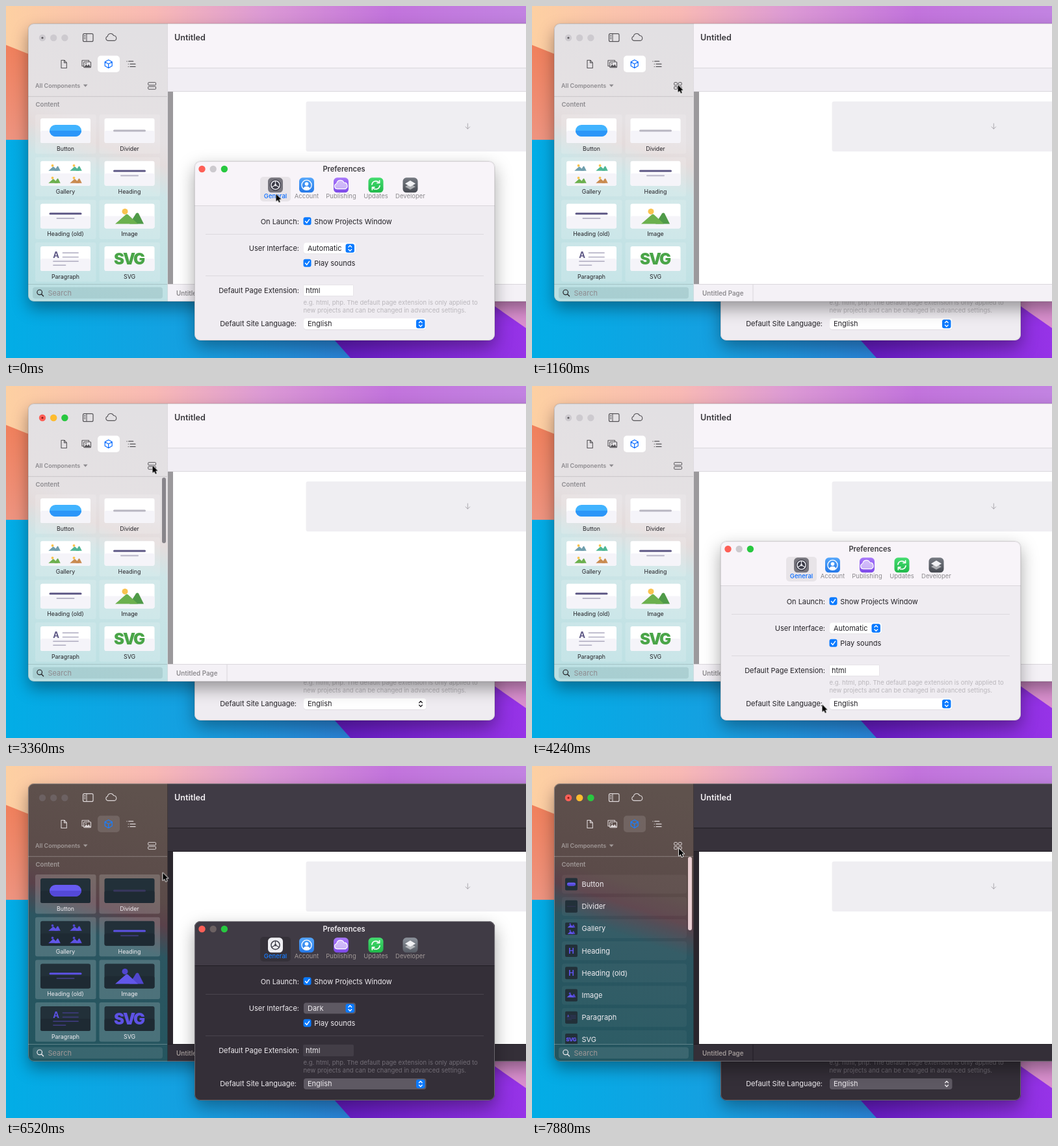
Animation, 800 px wide and 542 px high, one loop 8000 ms. Source, as an HTML page:

```html
<!DOCTYPE html>
<html lang="en">
<head>
<meta charset="utf-8">
<title>Preferences and appearance</title>
<style>
html, body { margin: 0; width: 100%; height: 100%; overflow: hidden; }
body {
  position: relative; background: #c27edc;
  font-family: Inter, Roboto, sans-serif;
  animation: flags 8s step-end infinite, theme 8s step-end infinite;
}
svg { position: absolute; display: block; width: 820px; height: 542px; left: 0; top: 0; }
text { white-space: pre; }

/* front: main window on top, key: main window active */
@keyframes flags {
  0% { --front: 0; --key: 0; --icon-grid: 0; --menu: 0; --picked: 0; }
  14% { --front: 2; }
  14.5% { --icon-grid: 1; }
  15% { --key: 1; }
  30.5% { --icon-grid: 0; }
  51.5% { --front: 0; --key: 0; }
  63% { --menu: 1; }
  75% { --menu: 0; --picked: 1; }
  88% { --front: 2; }
  88.5% { --key: 1; --icon-grid: 1; }
}
@keyframes theme {
  0% {
    --ink: #232126; --title: #3b393e; --sub: #8d8b8f; --icon: #555357; --accent: #0a6cff;
    --head: #f8f4f9; --bar: #f1eef4; --line: #dad7dc; --strip: #9b999c; --foot: #f4f1f6;
    --body: #efecf1; --ctl: #fff; --field: #fff; --rule: #dcd9de; --hint: #bab7bc;
    --cell: rgba(255,255,255,.15); --row: rgba(255,255,255,.15); --thumb: #fff; --thumb2: #f5f4f9;
    --tab: #fff; --off: #cdcacf; --dot: #5a585c; --rim: rgba(0,0,0,.13);
    --pill1: #41b3ff; --pill2: #2c96f8; --h1: #5d5785; --h2: #b8b5c8; --div: #b8b6c1;
    --leaf1: #6cb04e; --leaf2: #4f9a48; --sun: #f9c34f; --svg: #4aa548;
    --g1: #6f9fae; --g2: #4fb795; --g3: #c98b50; --search: rgba(0,50,60,.1);
    --thumbbar: rgba(112,110,116,.8); --sel: rgba(0,0,0,.065); --gear1: #77757d; --gear2: #e8e8ee; --gear3: #3b3b47;
    --dev1: #767a82; --dev2: #474a52;
    --s1: #e2e0e3; --s2: #e5e1e3; --s3: #e4dcdc; --s4: #cde5e7; --s5: #bbe0e3;
  }
  76% {
    --ink: #f0edf1; --title: #f2eff3; --sub: #a09897; --icon: #ded8d9; --accent: #187dff;
    --head: #403b45; --bar: #37323b; --line: #211e24; --strip: #2a262d; --foot: #342f38;
    --body: #342f38; --ctl: #5e5963; --field: #433e47; --rule: #49444d; --hint: #716c75;
    --cell: rgba(255,255,255,.17); --row: rgba(255,255,255,.045); --thumb: #223039; --thumb2: #1e2a33;
    --tab: rgba(255,255,255,.12); --off: #6c6162; --dot: #6c6162; --rim: rgba(255,255,255,.27);
    --pill1: #675bf1; --pill2: #5449d8; --h1: #5d52e5; --h2: #3d3a7a; --div: #38365f;
    --leaf1: #6257ea; --leaf2: #5046cf; --sun: #5046cf; --svg: #5d52e5;
    --g1: #5d52e5; --g2: #5d52e5; --g3: #5d52e5; --search: rgba(255,255,255,.1);
    --thumbbar: rgba(255,226,231,.87); --sel: rgba(0,0,0,.17); --gear1: #eeeef2; --gear2: #42424c; --gear3: #eeeef2;
    --dev1: #8d939c; --dev2: #565b64;
    --s1: #5f524d; --s2: #5b4b49; --s3: #5a414a; --s4: #2c5661; --s5: #23555f;
  }
}

.win { position: absolute; overflow: hidden; border-radius: 9px; }
#main {
  left: 34px; top: 27px; width: 784px; height: 428px; z-index: var(--front);
  box-shadow: 0 0 1px rgba(0,0,0,.5), 0 11px 24px rgba(0,0,0,.36);
}
#main svg { left: -34px; top: -27px; }
#prefs {
  left: 290px; top: 239px; width: 462px; height: 276px; z-index: 1;
  box-shadow: 0 0 1px rgba(0,0,0,.55), 0 10px 27px rgba(0,0,0,.34);
}
#prefs svg { left: -290px; top: -239px; }
#wall { z-index: -1; }

#grid { animation: grid 8s linear infinite; }
#list { animation: list 8s linear infinite; }
@keyframes grid { 0%, 17% { opacity: 1 } 19%, 33% { opacity: 0 } 35%, 90% { opacity: 1 } 92%, 100% { opacity: 0 } }
@keyframes list { 0%, 17% { opacity: 0 } 19%, 33% { opacity: 1 } 35%, 90% { opacity: 0 } 92%, 100% { opacity: 1 } }
#scroll-grid { animation: scroll-grid 8s linear infinite; }
#scroll-list { animation: scroll-list 8s linear infinite; }
@keyframes scroll-grid { 0%, 33% { opacity: 0 } 35%, 43.5% { opacity: 1 } 47%, 100% { opacity: 0 } }
@keyframes scroll-list { 0%, 17% { opacity: 0 } 19%, 25% { opacity: 1 } 28.5%, 90% { opacity: 0 } 92%, 100% { opacity: 1 } }

.hover { opacity: 0; animation: 8s step-end infinite; }
#hover0 { animation-name: hover0; }
#hover1 { animation-name: hover1; }
#hover2 { animation-name: hover2; }
@keyframes hover0 { 0% { opacity: 0 } 63% { opacity: 1 } 66.5% { opacity: 0 } }
@keyframes hover1 { 0% { opacity: 0 } 66.5% { opacity: 1 } 72.5% { opacity: 0 } }
@keyframes hover2 { 0% { opacity: 0 } 72.5% { opacity: 1 } 75% { opacity: 0 } }

#cursor {
  z-index: 9; width: 14px; height: 18px; overflow: visible;
  animation: cursor 8s ease-in-out infinite;
}
@keyframes cursor {
  0%, 2.5% { transform: translate(415.5px, 289.5px) }
  11.5%, 14.5% { transform: translate(224.5px, 121.5px) }
  20%, 43% { transform: translate(225.5px, 122.5px) }
  50%, 54% { transform: translate(446.5px, 490.5px) }
  61%, 64.5% { transform: translate(498px, 372px) }
  68.5%, 71.5% { transform: translate(494px, 391px) }
  73.5% { transform: translate(492px, 410px) }
  76.5% { transform: translate(492px, 410px); animation-timing-function: cubic-bezier(.4,0,.5,.9) }
  81.5% { transform: translate(241.5px, 165px); animation-timing-function: ease-out }
  83.5%, 100% { transform: translate(226px, 127px) }
}
</style>
</head>
<body>
<svg id="wall" viewBox="0 0 820 542">
  <defs>
    <linearGradient id="sky"><stop stop-color="#fdd0a2"/><stop offset=".28" stop-color="#f8b9b5"/><stop offset=".48" stop-color="#dc9ad4"/><stop offset=".72" stop-color="#c273dc"/><stop offset="1" stop-color="#c285e2"/></linearGradient>
    <linearGradient id="coral" x2="0" y2="1"><stop stop-color="#f0805c"/><stop offset="1" stop-color="#ee9480"/></linearGradient>
    <linearGradient id="sea"><stop stop-color="#02ade6"/><stop offset=".55" stop-color="#169fe0"/><stop offset="1" stop-color="#2b82d6"/></linearGradient>
    <linearGradient id="violet"><stop stop-color="#5f19bd"/><stop offset="1" stop-color="#9a35ea"/></linearGradient>
  </defs>
  <path fill="url(#sky)" d="M0 0H820V542H0z"/>
  <path fill="url(#coral)" d="M0 60L60 84V206H0z"/>
  <path fill="#d98fce" d="M640 380H820V520H640z"/>
  <path fill="url(#violet)" d="M480 440H720L820 510V542H480z"/>
  <path fill="url(#sea)" d="M0 206H300L505 514L530 542H0z"/>
</svg>
<div id="main" class="win"><svg viewBox="0 0 820 542"></svg></div>
<div id="prefs" class="win"><svg viewBox="0 0 820 542"></svg></div>
<svg id="cursor" viewBox="0 0 14 18"><path d="M0 0V11.4L2.6 9 4.5 13.1 6.4 12.2 4.6 8.2H8.2z" stroke="#fff" stroke-width="1.6" paint-order="stroke" stroke-linejoin="round"/></svg>

<script>
const v = name => `var(--${name})`;
const css = style => ` style="${style}"`;
const rect = (x, y, w, h, fill, r = 0, extra = '') =>
  `<rect x="${x}" y="${y}" width="${w}" height="${h}" rx="${r}" fill="${fill}" ${extra}/>`;
const circle = (x, y, r, fill, extra = '') => `<circle cx="${x}" cy="${y}" r="${r}" fill="${fill}" ${extra}/>`;
const line = (x1, x2, y, color, w = 1) =>
  `<path d="M${x1} ${y}H${x2}" stroke="${color}" stroke-width="${w}" stroke-linecap="${w > 1 ? 'round' : 'butt'}"/>`;
const stroke = (d, color, w = 1.1) =>
  `<path d="${d}" fill="none" stroke="${color}" stroke-width="${w}" stroke-linecap="round" stroke-linejoin="round"/>`;
const fill = (d, color) => `<path d="${d}" fill="${color}"/>`;
const at = (x, y, body, s = 1) => `<g transform="translate(${x} ${y}) scale(${s})">${body}</g>`;
const text = (x, y, str, size = 11, { color = v('ink'), weight = 400, anchor = 'start', extra = '' } = {}) =>
  `<text x="${x}" y="${y}" font-size="${size}" fill="${color}" font-weight="${weight}" text-anchor="${anchor}" ${extra}>${str}</text>`;
const lights = (x, y, colors) => colors.map((c, i) => circle(x + 17.2 * i, y, 5.2, c)).join('');
const RED = '#fe5f57', YELLOW = '#febc2e', GREEN = '#28c840';
const CLOUD = 'M-5 4.5a3.2 3.2 0 0 1-.6-6.3a4.5 4.5 0 0 1 8.6-1.2a3.9 3.9 0 0 1 1.6 7.5z';

// Component art, centred on 0,0 in a 77 x 38 box
const hill = (c1, c2) => circle(-7, -7, 4.5, v('sun')) +
  fill('M0 12L10-4Q12-6 14-4L22 12z', c2) + fill('M-22 12L-6-2Q-4-4-2-2L13 12z', c1);
const mini = (x, y, c) => at(x, y, hill(c, c), .42);
const heading = line(-23.5, 23.5, -3.7, v('h1'), 3) + line(-13, 13, 3.6, v('h2'), 2);
const letterH = text(0, 4, 'H', 11.5, { color: v('h1'), weight: 700, anchor: 'middle' });
const paragraph = text(-14.5, -1, 'A', 13, { color: v('h1'), weight: 700, anchor: 'middle' }) +
  [[-4, 19.5, -9], [-4, 19.5, -2.5], [-18.5, 19.5, 4], [-18.5, 0, 10]].map(([a, b, y]) => line(a, b, y, v('h2'), 1.8)).join('');
const letters = text(-1, 8.6, 'SVG', 24, { color: v('svg'), weight: 900, anchor: 'middle', extra: 'letter-spacing="-2"' });
const button = rect(-24.5, -9, 49, 18, v('pill1'), 9) + fill('M-24.5 0a9 9 0 0 0 9 9h31a9 9 0 0 0 9-9z', v('pill2'));
const divider = line(-23.5, 23.5, 0, v('div'), 3);
const image = hill(v('leaf1'), v('leaf2'));
const gallery = mini(-17, -9, v('g1')) + mini(16, -9, v('g2')) + mini(-17, 10, v('leaf1')) + mini(16, 10, v('g3'));
const parts = [
  ['Button', button, at(0, 0, button, .27)],
  ['Divider', divider, at(0, 0, divider, .27)],
  ['Gallery', gallery, at(0, -5, image, .27) + at(0, 5, image, .27)],
  ['Heading', heading, letterH],
  ['Heading (old)', heading, letterH],
  ['Image', image, at(0, -.5, image, .32)],
  ['Paragraph', paragraph, at(0, 0, paragraph, .34)],
  ['SVG', letters, at(0, 0, letters, .34)]
];

const cell = ([name, art], i) => at(45 + i % 2 * 98.5, 167 + (i >> 1) * 65.7,
  rect(0, 0, 93.5, 60.5, v('cell'), 3) + rect(8, 6, 77, 38, v('thumb'), 3) +
  rect(8, 25, 77, 19, v('thumb2'), 3) + at(46.5, 25, art) +
  text(46.5, 56, name, 8.8, { anchor: 'middle' }));
const row = ([name, , icon], i) => at(46, 182 + i * 34.2,
  rect(0, -14.5, 192, 29, v('row'), 4) + rect(5, -9.5, 19, 19, v('thumb'), 2) +
  at(14.5, 0, icon) + text(30.5, 4, name));

const viewIcon = (x, y, w) => rect(x, y, w, 4.2, 'none', 1, `stroke="${v('icon')}"`);
const stops = [0, .36, .44, .55, 1].map((o, i) => `<stop offset="${o}"${css(`stop-color:var(--s${i + 1})`)}/>`).join('');

const sidebar =
  rect(34, 27, 214.5, 428, 'url(#side)') +
  lights(56, 49, Array(3).fill(v('off'))) + circle(56, 49, 1.6, v('dot')) +
  `<g${css('opacity:var(--key)')}>${lights(56, 49, [RED, YELLOW, GREEN])}${circle(56, 49, 1.6, '#8c1a13')}</g>` +
  rect(118.5, 42.7, 15.5, 12, 'none', 2, `stroke="${v('icon')}" stroke-width="1.2"`) +
  stroke('M124 43V54.5M120.3 45.6h1.8M120.3 48h1.8M120.3 50.4h1.8', v('icon'), 1) +
  at(162.3, 48.6, stroke(CLOUD, v('icon'), 1)+'' , 1.06) +
  rect(141, 76.5, 34, 25.5, v('tab'), 5) +
  stroke('M85 83.5h4.7l3.6 3.8v8.2H85zM89.5 83.7v3.8h3.6', v('icon')) +
  stroke('M119.5 92.5h-2.5v-8.8h10.5v1.8', v('icon')) +
  rect(119.7, 86, 10.8, 8.8, 'none', 1, `stroke="${v('icon')}" stroke-width="1.1"`) +
  fill('M120.3 94l3-4 2.2 2.2 1.8-2.4 2.8 4.2z', v('icon')) + circle(123, 88.4, .9, v('icon')) +
  stroke('M157.7 83l5.5 3.1v6.2l-5.5 3.2-5.5-3.2v-6.2zM152.4 86.3l5.3 3 5.3-3M157.7 89.3v6', v('accent'), 1.2) +
  stroke('M186 85.2h.1M188.7 85.2h7M188.2 89.3h.1M191 89.3h8M188.2 93.4h.1M191 93.4h8', v('icon'), 1.2) +
  text(45, 125.8, 'All Components', 9, { color: v('sub'), weight: 600 }) +
  fill('M118.8 120.8h6.8l-3.4 4z', v('sub')) +
  `<g${css('opacity:calc(1 - var(--icon-grid))')}>${viewIcon(218.7, 117.7, 11.8)}${viewIcon(218.7, 124, 11.8)}</g>` +
  `<g${css('opacity:var(--icon-grid)')}>${[218.7, 225.4].map(x => viewIcon(x, 117.7, 4.8) + viewIcon(x, 124, 4.8)).join('')}</g>` +
  line(34, 248, 139.3, v('rim')) +
  text(45.5, 155, 'Content', 9.6, { color: v('sub'), weight: 600 }) +
  `<g clip-path="url(#pane)"><g id="grid">${parts.map(cell).join('')}</g><g id="list">${parts.map(row).join('')}</g></g>` +
  rect(240, 141, 6, 101, v('thumbbar'), 3, 'id="scroll-grid"') +
  rect(240, 140, 6, 113, v('thumbbar'), 3, 'id="scroll-list"') +
  line(34, 248, 428.5, v('rim')) +
  rect(41, 433, 200, 17.5, v('search'), 4) +
  circle(51.7, 440.8, 3.8, 'none', `stroke="${v('ink')}" stroke-width="1.2"`) +
  stroke('M54.6 443.7L57.6 446.7', v('ink'), 1.3) +
  text(64.5, 446, 'Search', 11, { color: v('sub') });

const editor =
  rect(248.5, 27, 570, 68.5, v('head')) + rect(248.5, 95.5, 570, 36, v('bar')) +
  rect(248.5, 131.5, 9, 297, v('strip')) + rect(257, 131.5, 560, 297, '#fff') +
  rect(248.5, 428.5, 570, 27, v('foot')) +
  line(248.5, 820, 95.5, v('line')) + line(248.5, 820, 131.5, v('line')) + line(248.5, 820, 428.5, v('line')) +
  fill('M248 27h1V455h-1z', v('line')) + fill('M339.5 429h1V455h-1z', v('line')) +
  text(259, 53.3, 'Untitled', 12.6, { color: v('title'), weight: 600 }) +
  rect(461.5, 147, 370, 77, '#efeef2', 3) +
  stroke('M710.3 181v8M707 186l3.3 3.3 3.3-3.3', '#aaa8ae', 1) +
  text(262, 445.5, 'Untitled Page', 9.8, { color: v('sub'), weight: 600 });

document.querySelector('#main svg').innerHTML =
  `<defs><linearGradient id="side" gradientUnits="userSpaceOnUse" x1="170" y1="27" x2="39" y2="427">${stops}</linearGradient>
  <clipPath id="pane"><path d="M34 140H248V428H34z"/></clipPath></defs>` +
  editor + sidebar + rect(34.5, 27.5, 790, 427, 'none', 8.5, `stroke="${v('rim')}"`);

// Preferences window
const end = { anchor: 'end' };
const check = (x, y) => rect(x, y, 12, 12, '#0a7aff', 3) + stroke(`M${x + 3} ${y + 6.3}l2.2 2.5 3.9-5.5`, '#fff', 1.5);
const arrows = (x, y, c) => stroke(`M${x - 2.4} ${y - 1.8}l2.4-2.5 2.4 2.5M${x - 2.4} ${y + 1.8}l2.4 2.5 2.4-2.5`, c, 1.3);
const popup = (x, y, w) => rect(x, y + .6, w, 17, 'rgba(0,0,0,.14)', 4) + rect(x, y, w, 17, v('ctl'), 4) +
  arrows(x + w - 8.5, y + 8.5, v('ink')) +
  `<g${css('opacity:calc(1 - var(--key))')}>${rect(x + w - 15.5, y + 1.8, 13.5, 13.5, '#0a7aff', 3.2)}${arrows(x + w - 8.7, y + 8.5, '#fff')}</g>`;

const gear = circle(0, 0, 8.6, v('gear3')) + circle(0, 0, 6.6, 'none', `stroke="${v('gear2')}" stroke-width="1.5"`) +
  circle(0, 0, 1.8, v('gear2')) + stroke('M0 0V-6M0 0L5.3 3M0 0L-5.3 3', v('gear2'), 1.2);
const person = circle(0, 0, 7.6, 'none', 'stroke="#fff" stroke-width="1.3"') + circle(0, -1.8, 2.8, '#fff') +
  fill('M-5 5.2a5.2 4.4 0 0 1 10 0a7 7 0 0 1-10 0z', '#fff');
const cloud = at(.5, 0, fill(CLOUD, 'rgba(255,255,255,.55)') + stroke(CLOUD, '#fff', .9), 1.3);
const refresh = stroke('M-6-1a6.1 6.1 0 0 1 11-2.6M6 1a6.1 6.1 0 0 1-11 2.6M5.6-7v3.7H2M-5.6 7V3.3H-2', '#fff', 1.7);
const layers = fill('M0-2L8 2.5 0 7-8 2.5z', 'rgba(255,255,255,.5)') + fill('M0-7L8-2.3 0 2.4-8-2.3z', '#f1f1f4');
const tabs = [
  ['General', 414.5, v('gear1'), v('gear1'), gear],
  ['Account', 462.5, '#54a6fb', '#2578e8', person],
  ['Publishing', 515.5, '#a878fa', '#7c48e8', cloud],
  ['Updates', 569, '#45dc70', '#20b94a', refresh],
  ['Developer', 622, v('dev1'), v('dev2'), layers]
];
const tab = ([name, x, top, bottom, art], i) =>
  `<linearGradient id="tab${i}" x2="0" y2="1"><stop${css('stop-color:' + top)}/><stop offset="1"${css('stop-color:' + bottom)}/></linearGradient>` +
  rect(x - 11.5, 264.3, 23, 23, `url(#tab${i})`, 5.5) + at(x, 275.8, art) +
  text(x, 295.8, name, 9.5, { anchor: 'middle', color: i ? v('sub') : v('accent'), weight: i ? 400 : 500 });

const option = (name, i) => {
  const y = 377 + i * 18.8;
  const mark = c => i ? '' : stroke('M453.5 373.5l2.2 2.6 4-6', c, 1.4);
  return text(464, y, name, 11, { color: '#232126' }) + mark('#232126') +
    `<g id="hover${i}" class="hover">${rect(448, y - 13.5, 78, 18.6, '#3f9afc', 3)}${text(464, y, name, 11, { color: '#fff' })}${mark('#fff')}</g>`;
};

document.querySelector('#prefs svg').innerHTML =
  rect(290, 239, 462, 276, v('body')) + rect(290, 239, 462, 68.5, v('head')) + line(290, 752, 307.5, v('line')) +
  lights(301.5, 251, [RED, v('off'), GREEN]) +
  text(520, 254.8, 'Preferences', 11.1, { color: v('title'), weight: 600, anchor: 'middle' }) +
  rect(391, 263, 47, 38, v('sel'), 5) + tabs.map(tab).join('') +
  text(451, 335.5, 'On Launch:', 11, end) + check(457.5, 325.3) + text(474.3, 335.5, 'Show Projects Window') +
  line(307, 735, 351.5, v('rule')) +
  text(451, 377, 'User Interface:', 11, end) + popup(458, 364.5, 80) +
  text(464, 377, 'Automatic', 11, { extra: css('opacity:calc(1 - var(--picked))') }) +
  text(464, 377, 'Dark', 11, { extra: css('opacity:var(--picked)') }) +
  check(457.5, 389.8) + text(474.3, 400, 'Play sounds') +
  line(307, 735, 415.5, v('rule')) +
  text(451, 442, 'Default Page Extension:', 11, end) +
  rect(457.5, 429.5, 77, 17, v('field'), 1, `stroke="${v('rule')}" stroke-width=".6"`) + text(461, 442, 'html') +
  text(457.5, 460, 'e.g. html, php. The default page extension is only applied to', 9.5, { color: v('hint') }) +
  text(457.5, 471.7, 'new projects and can be changed in advanced settings.', 9.5, { color: v('hint') }) +
  text(447, 493.3, 'Default Site Language:', 11, end) + popup(458, 481, 188.5) + text(464, 493.3, 'English') +
  `<g${css('opacity:var(--menu)')}>${rect(444, 359, 86.5, 65, '#e9e6eb', 5, 'stroke="#c5c2c7" stroke-width=".7"' + css('filter:drop-shadow(0 4px 6px rgba(0,0,0,.3))'))}${['Automatic', 'Light', 'Dark'].map(option).join('')}</g>` +
  rect(290.5, 239.5, 461, 275, 'none', 8.5, `stroke="${v('rim')}"`);
</script>
</body>
</html>
```
